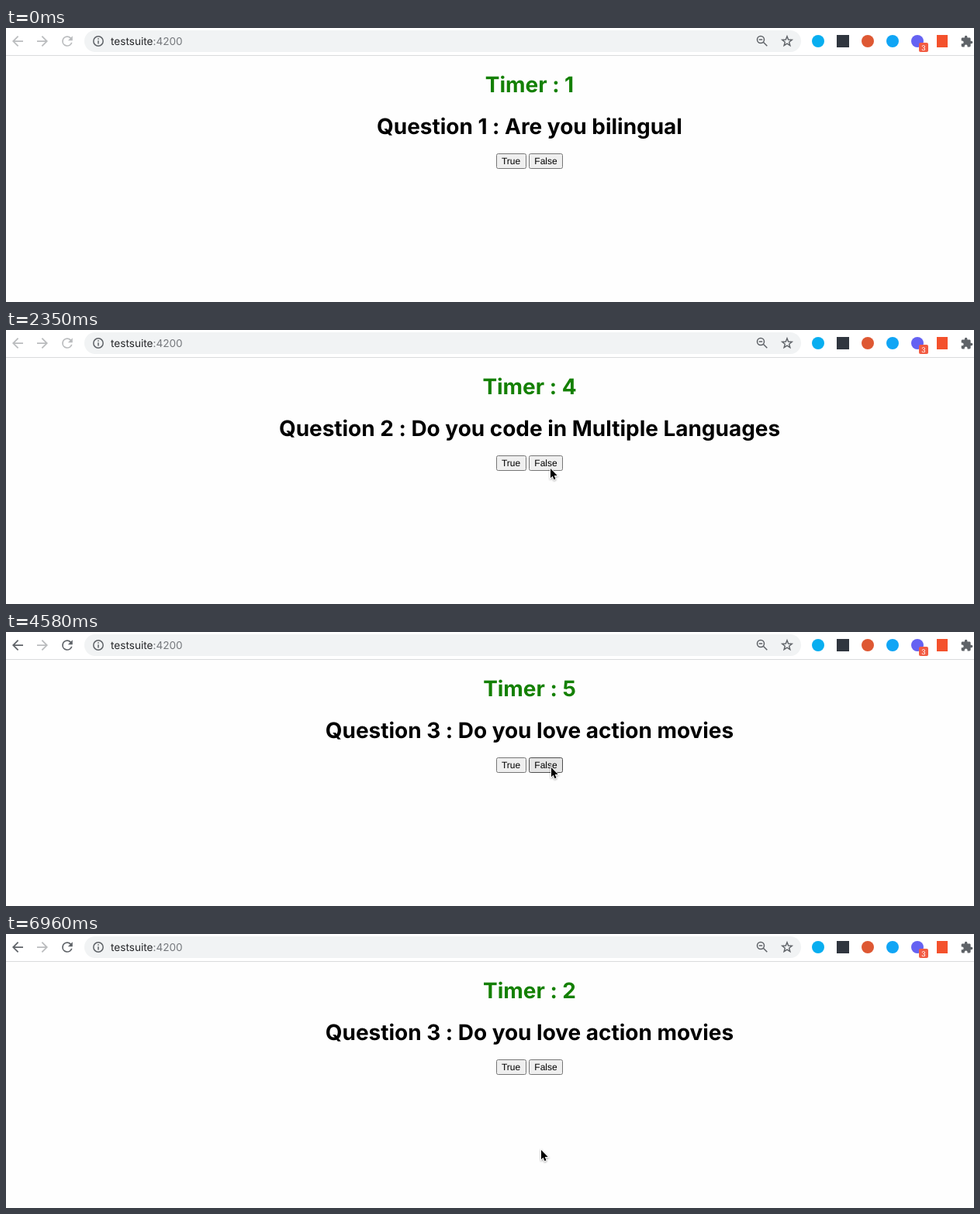
An HTML page that plays this animation: 1248 px wide and 354 px high, repeating every 8000 ms.

```html
<!DOCTYPE html>
<html lang="en">
<head>
<meta charset="utf-8">
<title>Quiz timer</title>
<style>
  html, body { margin: 0; width: 100%; height: 100%; overflow: hidden; background: #fefefe; }
  svg { display: block; }
  text { text-rendering: geometricPrecision; }
  .head {
    font: 700 27.95px Inter, sans-serif;
    font-optical-sizing: none;
    font-feature-settings: "calt" 0;
    text-anchor: middle;
  }
  .url { font: 13.6px Inter, sans-serif; fill: #26272a; }
  .label { font: 12px "Liberation Sans", Arial, sans-serif; text-anchor: middle; }
  .badge { font: 9.5px "Liberation Sans", Arial, sans-serif; text-anchor: middle; fill: #fff; }
  .icon { fill: #5f6368; fill-rule: evenodd; }
  .off { fill: #babcbe; }
  .button { fill: #efefef; stroke: #767676; }
  .hover { fill: #e5e5e5; stroke: #4f4f4f; }
  #cursor { filter: drop-shadow(0 1px 0.8px rgba(0, 0, 0, .35)); }
</style>
</head>
<body>
<svg width="1248" height="354" viewBox="0 0 1248 354">
  <defs>
    <path id="arrow" d="M20 11H7.83l5.59-5.59L12 4l-8 8 8 8 1.41-1.41L7.83 13H20z"/>
  </defs>

  <!-- Browser bar -->
  <rect width="1248" height="35" fill="#fff"/>
  <rect y="35" width="1248" height="1" fill="#dadbdc"/>
  <rect x="101" y="3" width="924" height="28" rx="14" fill="#f1f3f4"/>
  <use id="back" href="#arrow" class="icon" transform="translate(4.5 6.5) scale(.875)"/>
  <use href="#arrow" class="icon off" transform="translate(57.5 27.5) scale(-.875)"/>
  <path id="reload" class="icon" transform="translate(68.8 6.8) scale(.85)"
    d="M17.65 6.35A7.96 7.96 0 0 0 12 4a8 8 0 1 0 7.73 10h-2.08A6 6 0 1 1 12 6c1.66 0 3.14.69 4.22 1.78L13 11h7V4z"/>
  <g fill="none" stroke="#5f6368" stroke-width="1.5">
    <circle cx="119" cy="17" r="6.2"/>
    <path d="M119 13.2v1.6M119 16.2v4.4"/>
    <circle cx="973" cy="15" r="4.5"/>
    <path d="M976.3 18.3l5 5M970.8 15h4.4"/>
  </g>
  <text class="url" x="135" y="22">testsuite<tspan fill="#76797d">:4200</tspan></text>
  <path id="star" fill="none" stroke="#5f6368" stroke-width="1.4"/>

  <!-- Extension buttons -->
  <circle cx="1047" cy="17" r="8" fill="#08aef0"/>
  <rect x="1071" y="9" width="16" height="16" fill="#30363f"/>
  <circle cx="1111" cy="17" r="8" fill="#de5833"/>
  <circle cx="1143" cy="17" r="8" fill="#10a5f5"/>
  <circle cx="1175" cy="17" r="8" fill="#6562f2"/>
  <rect x="1177" y="19" width="12" height="12" rx="2" fill="#f25c43"/>
  <text class="badge" x="1183" y="28.6">3</text>
  <rect x="1200" y="9" width="14" height="16" fill="#f4512c"/>
  <path class="icon" transform="translate(1230.3 9) scale(.7)"
    d="M20.5 11H19V7c0-1.1-.9-2-2-2h-4V3.5a2.5 2.5 0 0 0-5 0V5H4c-1.1 0-2 .9-2 2v3.8h1.5a2.7 2.7 0 0 1 0 5.4H2V20c0 1.1.9 2 2 2h3.8v-1.5a2.7 2.7 0 0 1 5.4 0V22H17c1.1 0 2-.9 2-2v-4h1.5a2.5 2.5 0 0 0 0-5z"/>

  <!-- Quiz -->
  <text id="timer" class="head" x="675" y="83" fill="#148003"></text>
  <text id="question" class="head" x="675" y="137"></text>
  <rect class="button" x="632.5" y="162.5" width="38" height="19" rx="2"/>
  <text class="label" x="651" y="176">True</text>
  <rect id="falseButton" class="button" x="674.5" y="162.5" width="43" height="19" rx="2"/>
  <text class="label" x="696" y="176">False</text>

  <g id="cursor">
    <path d="M0 1V13.2L2.6 10.8 4.5 15.2 6.5 14.3 4.7 10.1H8.7z"
      stroke="#fff" stroke-width="1.8" paint-order="stroke"/>
  </g>
</svg>
<script>
const LOOP = 8000;

// The screen refreshes in beats, counted from the second question.
const BEAT = 148.3;
const FIRST_BEAT = 1460;
const BACK_READY = 13;

// One second in beats, and the beat of a tick.
const SECOND = 1000 / BEAT;
const TICK = 3.15;
const TIME_LIMIT = 5;

const questions = [
  { start: -34, text: "Are you bilingual" },
  { start: 0, text: "Do you code in Multiple Languages" },
  { start: 21, text: "Do you love action movies" }
];

// The pointer rests at each stop between the beats "from" and "to".
const stops = [
  { from: 0, to: 0, x: 831, y: 231 },
  { from: 2, to: 2, x: 656, y: 153 },
  { from: 4, to: 4, x: 709, y: 179 },
  { from: 6, to: 9, x: 702, y: 178 },
  { from: 10, to: 11, x: 752, y: 215 },
  { from: 13, to: 13, x: 705, y: 181 },
  { from: 16, to: 22, x: 703, y: 174 },
  { from: 23, to: Infinity, x: 690, y: 278 }
];

const el = id => document.getElementById(id);
const [back, reload, timer, question, falseButton, cursor] =
  ["back", "reload", "timer", "question", "falseButton", "cursor"].map(el);

function starPath(cx, cy, outer, inner) {
  const points = Array.from({ length: 10 }, (_, i) => {
    const angle = i * Math.PI / 5 - Math.PI / 2;
    const r = i % 2 ? inner : outer;
    return `${cx + r * Math.cos(angle)} ${cy + r * Math.sin(angle)}`;
  });
  return `M${points.join("L")}z`;
}

function setText(node, text) {
  if (node.textContent !== text) node.textContent = text;
}

const ticks = beat => Math.floor((beat - TICK) / SECOND);

function timeLeft(beat, start) {
  return Math.max(1, TIME_LIMIT - ticks(beat) + ticks(start));
}

function pointerAt(beat) {
  const i = stops.findLastIndex(stop => stop.from <= beat);
  const a = stops[i];
  if (beat <= a.to) return a;
  const b = stops[i + 1];
  const ease = ((beat - a.to) / (b.from - a.to)) ** 2;
  return { x: a.x + (b.x - a.x) * ease, y: a.y + (b.y - a.y) * ease };
}

const overFalse = ({ x, y }) => x > 674 && x < 718 && y > 162 && y < 178;

function draw(t) {
  const beat = Math.floor((t - FIRST_BEAT) / BEAT);
  const index = questions.findLastIndex(q => q.start <= beat);
  const { start, text } = questions[index];
  setText(timer, `Timer : ${timeLeft(beat, start)}`);
  setText(question, `Question ${index + 1} : ${text}`);
  for (const icon of [back, reload]) icon.classList.toggle("off", beat < BACK_READY);

  const pointer = beat < 0 ? null : pointerAt(beat);
  falseButton.classList.toggle("hover", pointer !== null && overFalse(pointer));
  cursor.setAttribute("visibility", pointer ? "visible" : "hidden");
  if (pointer) cursor.setAttribute("transform", `translate(${pointer.x} ${pointer.y})`);
}

el("star").setAttribute("d", starPath(1007, 17.3, 6.6, 2.8));

const begin = performance.now();
function tick() {
  draw((performance.now() - begin) % LOOP);
  requestAnimationFrame(tick);
}
tick();
</script>
</body>
</html>
```
